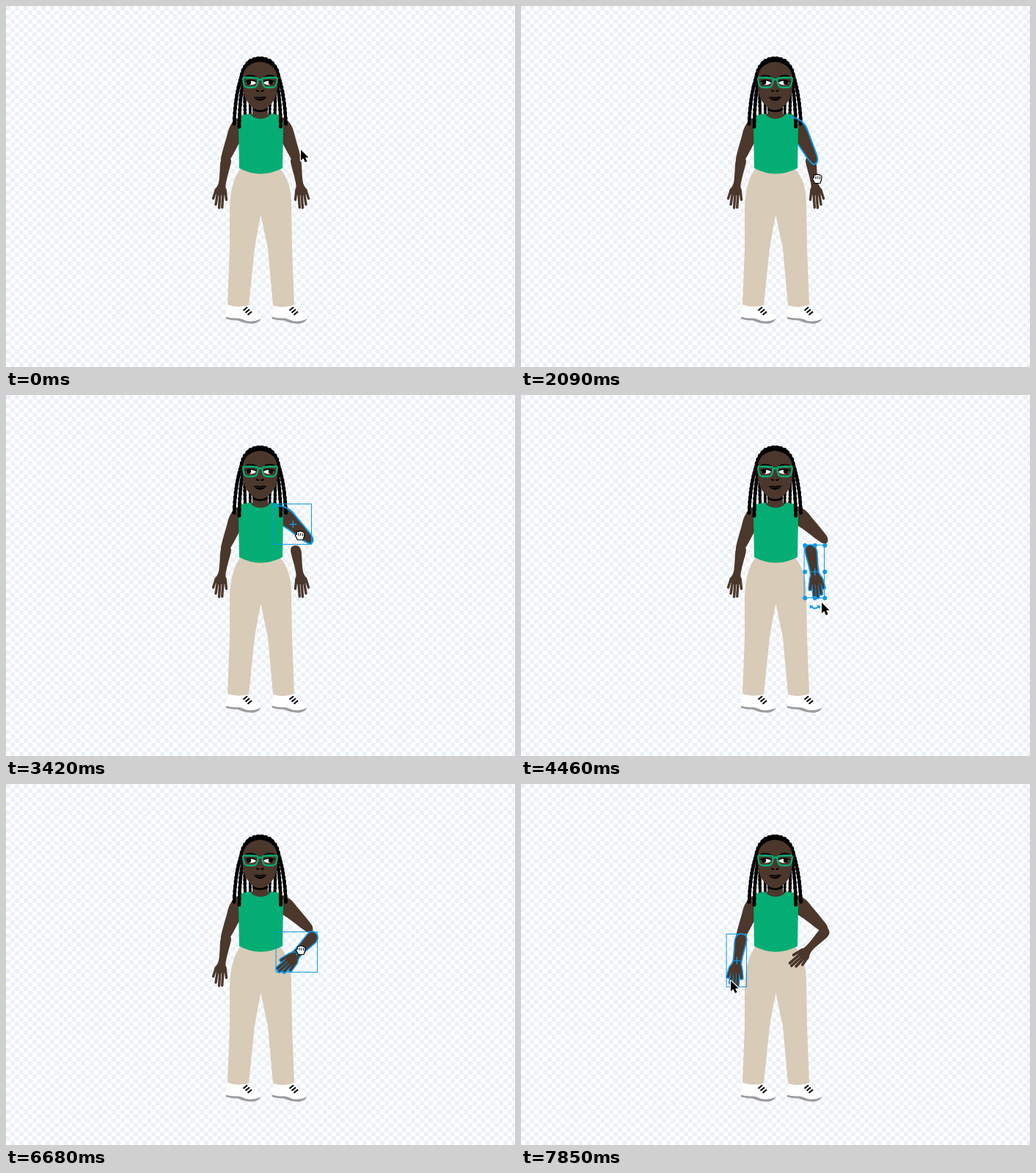
Animation, 694 px wide and 492 px high, one loop 8 s. Source, as an HTML page with a canvas:

```html
<!DOCTYPE html>
<html lang="en">
<head>
<meta charset="utf-8">
<title>Posing a figure</title>
<style>
  html, body { margin: 0; width: 100%; height: 100%; overflow: hidden; background: #fff; }
  canvas { display: block; width: 694px; height: 492px; }
</style>
</head>
<body>
<canvas id="stage" width="694" height="492"></canvas>
<script>
const ctx = document.getElementById('stage').getContext('2d');
const LOOP = 8000, STEP = 148.15;
const SKIN = '#4b372b', GREEN = '#04ad74', SAND = '#d8cbb7', BLUE = '#0d98ea', INK = '#000';
const TAU = Math.PI * 2;

// Each track: [step, value, value...], linear in between.
const CURSOR = [
  [0, 402, 196], [1, 399, 193], [3, 393, 188], [7, 393, 188], [8, 396, 205], [10, 398, 258],
  [12, 390, 230], [13, 390, 230], [14, 404, 235], [18, 412, 232], [20, 402, 205], [21, 395, 199],
  [23, 401, 191], [25, 401, 191], [28, 398, 235], [30, 410, 283], [32, 400, 289], [35, 376, 292],
  [38, 345, 286], [40, 345, 286], [41, 365, 275], [42, 425, 250], [43, 406, 236], [45, 402, 226],
  [47, 402, 226], [48, 398, 219], [50, 345, 255], [51, 310, 270], [53, 286, 268]
];
const UPPER_TURN = [[13, 0], [14, -5], [18, -24]];
const UPPER_MOVE = [[21, 0, 0], [23, 6, -8]];
const FORE_TURN = [[32, 0], [38, 53]];
const FORE_MOVE = [[43, 0, 0], [45, -3, -10], [47, -3, -10], [48, -7, -17]];
const HAND_SPANS = [[14, 18], [21, 24], [32, 40], [43, 48]];
const MODES = [
  [0], [1, 'upper', 'hover'], [8, 'upper', 'select'], [14, 'upper', 'turn'], [19, 'upper', 'select'],
  [21, 'upper', 'hover'], [25, 'upper', 'select'], [27, 'fore', 'hover'], [28, 'fore', 'select'],
  [33, 'fore', 'turn'], [40, 'fore', 'select'], [43, 'fore', 'hover'], [48, 'fore', 'select'],
  [50], [52, 'left', 'hover']
];

const upperFill = new Path2D('M371 150C382 151 389 160 392 170C395 182 399 194 401.5 205C403.5 213 400 217 395.5 216.5C390 213 384 199 377 187L366 170Z');
const upperEdge = new Path2D('M371 150C382 151 389 160 392 170');
const foreBody = new Path2D('M388.3 214C387 207 391 205 395 205C400 205 402 209 402.8 214C403.6 225 403.6 235 405.3 242C406.5 246 410 249 411 252L407.5 258L397.5 258L394.8 253C395.2 249 396 246 395.2 242C393.5 232 390 222 388.3 214Z');
const fingers = new Path2D('M396 250L394.5 264M399 256L400.3 274.6M403 256L404.5 275M406.5 255L409 270.5M408.5 250L412.5 262.3');
// Circles [x, y, r] that span each part, for its bounding box.
const UPPER = { cx: 389, cy: 183, hull: [[371, 150, 0], [380, 158, 7], [394.5, 209.5, 6.8]] };
const FORE = { cx: 400.5, cy: 241, hull: [[394.7, 212.5, 7.5], [394.5, 264, 1.8], [400.3, 274.6, 1.8], [404.5, 275, 1.8], [412.5, 262.3, 1.8]] };

const shirt = new Path2D('M321 149L333 146.5C337 156 357 156 361 146.5L371 148Q378 153 378 165L377 221Q347 236.5 318 221L317 165Q316 154 321 149Z');
const trousers = new Path2D('M319 222L374 222C385 235 389 252 389 268L390 330L393 407Q380 413 364 408L357 330Q351 303 347.5 284Q343 306 339 330L331 408Q315 412 302 407L305 330L305 275C306 252 309 238 319 222Z');
const sole = new Path2D('M300 421L300 426.5Q309 429 316 428.5Q326 433 337 433Q347 431 347.5 425Z');
const shoe = new Path2D('M302 407Q315 412 328 408Q334 414 344 420Q348 423 347 426.5Q337 431.5 327 429Q320 425 314 425.5Q306 426 300 423.5Q300 414 302 407Z');
const face = new Path2D('M323 97C324 83 335 77 346 76C358 77 369 83 370 97C371 114 369 125 362 133Q354 142 346.5 142Q338 142 331 133C324 125 322 114 323 97Z');
const arrow = new Path2D('M0 0L0 14.5L3.4 11.4L5.8 17L8.6 15.8L6.2 10.4L10.6 10.4Z');
const palm = new Path2D('M-3.5 6.5L-6.3 1Q-7 -1 -4.5 -1L-4.7 -4Q-3.6 -6 -2 -4.6Q-.6 -6.8 1 -5Q2.8 -6.2 3.8 -4Q6 -4.2 6 -2L5.5 2L4 6.5Z');

const checker = (() => {
  const cell = 6, tile = document.createElement('canvas');
  tile.width = tile.height = cell * 2;
  const g = tile.getContext('2d');
  g.fillStyle = '#fefefe';
  g.fillRect(0, 0, cell * 2, cell * 2);
  g.fillStyle = '#ecf1f8';
  g.fillRect(0, 0, cell, cell);
  g.fillRect(cell, cell, cell, cell);
  return ctx.createPattern(tile, 'repeat');
})();

function sample(track, n) {
  const next = track.findIndex(k => k[0] > n);
  if (next === 0) return track[0].slice(1);
  if (next < 0) return track[track.length - 1].slice(1);
  const a = track[next - 1], b = track[next], u = (n - a[0]) / (b[0] - a[0]);
  return a.slice(1).map((v, i) => v + (b[i + 1] - v) * u);
}

function fill(path, color) { ctx.fillStyle = color; ctx.fill(path); }

function stroke(path, color, width) {
  ctx.strokeStyle = color;
  ctx.lineWidth = width;
  ctx.stroke(path);
}

function line(d, color, width) { stroke(new Path2D(d), color, width); }

function disc(x, y, rx, ry = rx, color = INK) {
  ctx.fillStyle = color;
  ctx.beginPath();
  ctx.ellipse(x, y, rx, ry, 0, 0, TAU);
  ctx.fill();
}

function mirrored(draw, axis = 347.5) {
  ctx.save();
  ctx.translate(axis * 2, 0);
  ctx.scale(-1, 1);
  draw();
  ctx.restore();
}

function posed(part, pose, draw) {
  ctx.save();
  ctx.translate(part.cx + pose.x, part.cy + pose.y);
  ctx.rotate(pose.turn);
  ctx.translate(-part.cx, -part.cy);
  draw();
  ctx.restore();
}

function bounds(part, pose) {
  const c = Math.cos(pose.turn), s = Math.sin(pose.turn);
  const b = { l: 1e4, t: 1e4, r: 0, b: 0 };
  for (const [px, py, r] of part.hull) {
    const dx = px - part.cx, dy = py - part.cy;
    const x = part.cx + pose.x + dx * c - dy * s, y = part.cy + pose.y + dx * s + dy * c;
    b.l = Math.min(b.l, x - r); b.r = Math.max(b.r, x + r);
    b.t = Math.min(b.t, y - r); b.b = Math.max(b.b, y + r);
  }
  return b;
}

function upperArm(lit) {
  fill(upperFill, SKIN);
  if (lit) stroke(upperFill, BLUE, 2);
}

function forearm(lit) {
  if (lit) {
    stroke(foreBody, BLUE, 3.4);
    stroke(fingers, BLUE, 6.4);
  }
  fill(foreBody, SKIN);
  stroke(fingers, SKIN, 3.4);
}

function braid(x0, y0, cx, cy, x1, y1, r = 2.5) {
  line(`M${x0} ${y0}Q${cx} ${cy} ${x1} ${y1}`, INK, r * 1.7);
  const count = Math.round(Math.hypot(x1 - x0, y1 - y0) / 5);
  for (let i = 0; i <= count; i++) {
    const t = i / count, u = 1 - t;
    disc(u * u * x0 + 2 * u * t * cx + t * t * x1, u * u * y0 + 2 * u * t * cy + t * t * y1, r, r + .6);
  }
}

function bothSides(draw) { draw(); mirrored(draw, 346.3); }

function backHair() {
  bothSides(() => {
    braid(326, 105, 325, 125, 326, 147, 2.2);
    braid(332.5, 125, 333, 135, 333, 146, 2);
  });
}

function head() {
  for (let i = 0; i <= 15; i++) {
    const a = Math.PI * (1 + i / 15);
    disc(346.3 + 24 * Math.cos(a), 99 + 26.5 * Math.sin(a), 4);
  }
  disc(346.3, 99, 25.5, 27);
  bothSides(() => {
    braid(333, 75, 314, 95, 311, 160);
    braid(334, 78, 319, 95, 318, 164);
  });
  fill(face, SKIN);
  line('M326 97Q332 92.5 341 97M352 97Q360 92.5 367 97', INK, 2);
  disc(334, 104.5, 6.5, 3, '#fff');
  disc(358, 104.5, 6.5, 3, '#fff');
  disc(331, 104, 3.2);
  disc(361, 104, 3.2);
  line('M327 103Q333 99.5 341 103M351 103Q358 99.5 366 103', INK, 1.4);
  line('M325 97.5L341 98Q344 98 343.5 102Q343 111 337 111L329 111Q324 111 323.2 100Q323 97.5 325 97.5Z', GREEN, 2.3);
  line('M368 97.5L352 98Q349 98 349.5 102Q350 111 356 111L364 111Q369 111 369.8 100Q370 97.5 368 97.5ZM343.5 101Q346.5 99 349.5 101', GREEN, 2.3);
  line('M341.8 114.8Q343 117 344.5 115.8M348 115.8Q350 117 350.8 114.8', INK, 1.7);
  fill(new Path2D('M337.5 124.5Q342 123 346.5 124.2Q351 123 355.5 124Q352 128.7 346.5 129.2Q341 128.7 337.5 124.5Z'), INK);
  line('M340 125.5Q347 127 353 125.3', SKIN, .7);
}

function shoes() {
  for (const dx of [0, 63]) {
    ctx.save();
    ctx.translate(dx, 0);
    fill(sole, '#9c9c9e');
    fill(shoe, '#fff');
    ctx.lineCap = 'butt';
    line('M323.5 415L329 410.5M326.5 418L332 413.5M329.5 421L335 416.5', INK, 2.2);
    ctx.restore();
  }
}

function selection(b, full) {
  const mx = (b.l + b.r) / 2, my = (b.t + b.b) / 2;
  ctx.strokeStyle = BLUE;
  ctx.lineWidth = 1;
  ctx.strokeRect(Math.round(b.l) - .5, Math.round(b.t) - .5, Math.round(b.r - b.l), Math.round(b.b - b.t));
  line(`M${mx - 4.5} ${my}h9M${mx} ${my - 4.5}v9`, BLUE, 1.4);
  if (!full) return;
  for (const x of [b.l, mx, b.r])
    for (const y of [b.t, my, b.b])
      if (x !== mx || y !== my) disc(x, y, 3, 3, BLUE);
  const y = b.b + 12;
  line(`M${mx - 5} ${y}Q${mx} ${y + 4} ${mx + 5} ${y}`, BLUE, 2);
  fill(new Path2D(`M${mx - 7} ${y + 3}v-5h5ZM${mx + 7} ${y + 3}v-5h-5Z`), BLUE);
}

function pointer(x, y, hand) {
  ctx.save();
  ctx.translate(x, y);
  if (hand) {
    fill(palm, '#fff');
    stroke(palm, INK, 1.2);
    line('M-2 -2.5v3M.8 -2.5v3M3.5 -2v2.5', INK, 1);
  } else {
    stroke(arrow, '#fff', 2.4);
    fill(arrow, INK);
  }
  ctx.restore();
}

function pose(turn, move, n) {
  const [x, y] = sample(move, n);
  return { x, y, turn: sample(turn, n)[0] * Math.PI / 180 };
}

function render(time) {
  const n = Math.min(53, Math.floor((time % LOOP + 4) / STEP));
  const upper = pose(UPPER_TURN, UPPER_MOVE, n), fore = pose(FORE_TURN, FORE_MOVE, n);
  const [, active, style] = MODES.filter(m => m[0] <= n).pop();
  ctx.lineCap = ctx.lineJoin = 'round';
  ctx.fillStyle = checker;
  ctx.fillRect(0, 0, 694, 492);

  shoes();
  fill(trousers, SAND);
  mirrored(() => { upperArm(false); forearm(active === 'left'); });
  if (active !== 'fore') posed(FORE, fore, () => forearm(false));
  posed(UPPER, upper, () => upperArm(active === 'upper'));
  backHair();
  fill(new Path2D('M336 130H357V147Q364 150 361 156H332Q329 150 336 147Z'), SKIN);
  fill(new Path2D('M336 136H357V142Q347 147 336 142Z'), INK);
  fill(shirt, GREEN);
  head();
  if (active === 'fore' || n >= 38) posed(FORE, fore, () => forearm(active === 'fore'));
  if (active === 'upper') posed(UPPER, upper, () => stroke(upperEdge, BLUE, 2));

  if (active && style !== 'turn') {
    const b = active === 'upper' ? bounds(UPPER, upper) : bounds(FORE, fore);
    if (active === 'left') Object.assign(b, bounds(FORE, { x: -106.5, y: 0, turn: 0 }));
    selection(b, style === 'select');
  }
  const [x, y] = sample(CURSOR, n);
  pointer(x, y, HAND_SPANS.some(([from, to]) => n >= from && n <= to));
}

function tick() {
  render(performance.now());
  requestAnimationFrame(tick);
}
tick();
</script>
</body>
</html>
```
